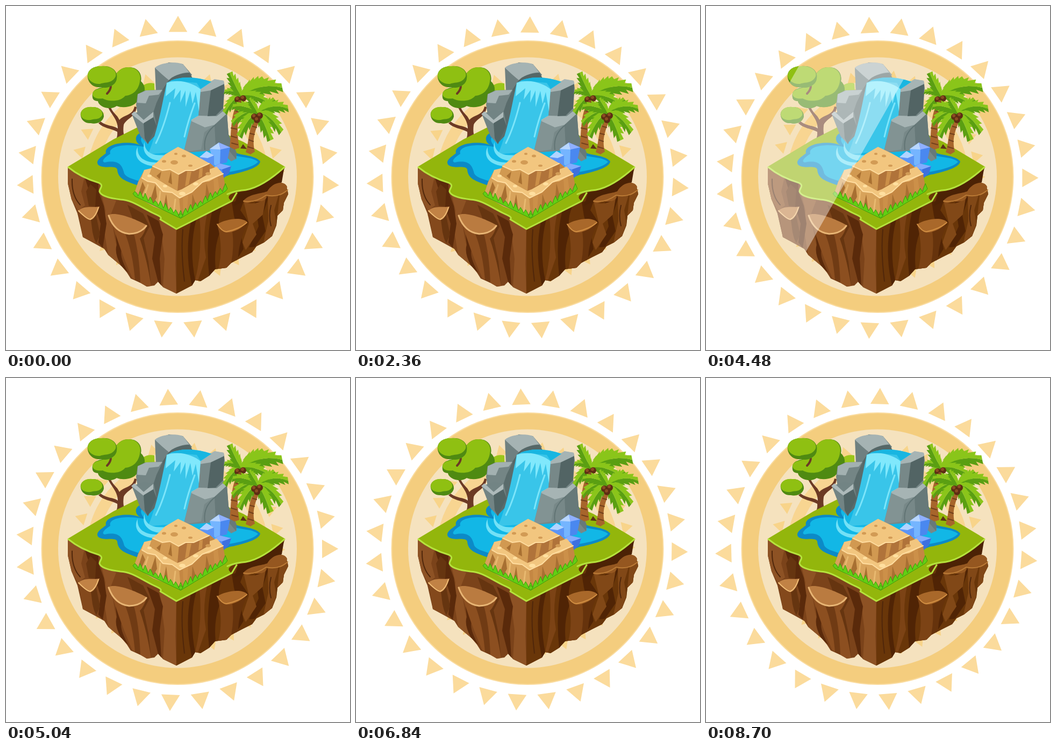
An HTML page for the animation above (8.84 s loop, 640 by 640 pixels).

```html
<!DOCTYPE html>
<html lang="en">
<head>
<meta charset="utf-8">
<title>Floating island</title>
<style>
html, body { margin: 0; width: 100%; height: 100%; overflow: hidden; background: #fff; }
svg { display: block; width: 100vw; height: 100vh; }
.line { fill: none; stroke-linecap: round; stroke-linejoin: round; }
</style>
</head>
<body>
<svg viewBox="0 0 640 640">
<defs>
  <mask id="cut" maskUnits="userSpaceOnUse" x="0" y="0" width="640" height="640" style="mask-type:alpha"><use href="#isle"/></mask>
</defs>
<g id="outer" fill="#fbdb9c"></g>
<circle cx="319" cy="317.5" r="252.5" fill="#f4cd7e" stroke="#fadb9d" stroke-width="2"/>
<circle cx="319" cy="317.5" r="222" fill="#f5e2be"/>
<g id="inner" fill="#f8d48a">
  <circle r="237.5" fill="none" stroke="#f8d591" stroke-width="31"/>
</g>

<g id="isle">
  <!-- tree -->
  <path fill="#9bc71a" d="M242 166C248 148 262 141 276 144L277 172 245 180Z"/>
  <path fill="#6c3a24" d="M195 257C205 252 208 243 207 234 194 227 182 228 172 218L176 215C188 224 200 222 208 228 208 212 197 203 190 189L194 187C200 201 207 202 211 212 219 202 236 204 239 187L243 188C241 207 224 209 219 221 217 235 219 247 229 254L219 253 213 258 208 254Z"/>
  <path fill="#4f8a12" d="M161 170C158 153 175 153 190 148 202 132 207 114 228 114 244 113 254 125 251 140 262 150 260 165 246 173 242 188 218 191 206 186 191 196 172 186 171 177 164 177 161 173 161 170Z"/>
  <path fill="#8fc012" d="M161 165C161 153 177 155 190 148 204 131 207 114 228 114 244 114 253 127 249 140 247 156 236 166 222 167 212 179 190 178 180 172 172 173 163 172 161 165Z"/>
  <path class="line" stroke="#6c3a24" stroke-width="4" d="M188 163Q194 157 195 150"/>
  <path fill="#4f8a12" d="M152 133C150 121 161 111 178 112 197 110 209 122 206 135 205 148 187 155 177 151 162 153 153 142 152 133Z"/>
  <path fill="#8fc012" d="M152 130C152 118 165 111 178 112 197 111 207 122 204 131 197 145 184 141 175 145 164 146 153 139 152 130Z"/>
  <path fill="#4f8a12" d="M139 204C137 192 151 187 160 188 174 187 183 197 182 206 179 218 165 220 158 218 147 219 140 212 139 204Z"/>
  <path fill="#8fc012" d="M139 202C139 191 151 187 160 188 172 187 181 195 179 203 173 213 164 209 158 212 147 213 140 209 139 202Z"/>

  <!-- soil -->
  <path fill="#7b431a" d="M115 299L115 330 122 360 133 386 143 430 165 442 183 452 190 463 215 484 225 496 232 507 250 515 262 522 276 520 283 513 292 523 317 535 346 520 352 510 362 512 378 502 388 490 410 487 419 478 440 467 458 458 466 447 480 440 495 428 503 408 505 390 515 380 517 366 525 350 521 334 509 328 519 299 317 400Z"/>
  <path fill="#693609" d="M317 412L317 535 346 520 352 510 362 512 378 502 388 490 410 487 419 478 440 467 458 458 466 447 480 440 495 428 503 408 505 390 515 380 517 366 525 350 521 334 509 328 519 299 430 340Z"/>
  <path fill="#8d5224" d="M115 299L146 318 140 345 147 371 134 381 122 360 115 330ZM176 345L205 362 195 388 202 430 215 484 190 463 183 420 185 380ZM286 398L317 414 315 480 317 535 292 523 295 470Z"/>
  <path fill="#5a2a0b" d="M146 317L172 328 172 345 182 372 187 405 180 450 172 440 176 405 166 374 157 352ZM262 388L284 400 292 425 286 470 289 520 283 513 272 470 277 430ZM204 425Q214 430 216 450 209 465 228 497L214 483Q201 460 206 444Z"/>
  <path fill="#663510" d="M157 331L168 342 166 373 154 372 149 345ZM226 370L255 386 267 410 256 432 265 475 270 521 250 513 246 470 231 430 239 405ZM158 395L166 382 175 425 168 441 158 420Z"/>
  <path fill="#8c4f20" d="M196 400Q216 424 239 424L262 408Q257 425 249 433 262 470 270 521L262 522 235 506Q215 462 196 400Z"/>
  <path fill="#703b14" d="M222 424Q236 460 240 510L250 515Q248 462 238 424Z"/>
  <path fill="#502405" d="M344 402L354 397Q340 450 352 510L346 520Q332 460 344 402ZM383 383L402 374Q392 398 398 420 386 452 390 489L378 502Q371 440 383 383ZM420 365L444 358 436 380 451 402 437 424 442 452 428 474 434 430 424 390ZM463 366L489 354 477 390 483 419 463 448 452 449 470 410Z"/>
  <path fill="#7c4315" d="M360 393L374 387Q365 430 372 468L357 511 352 510Q366 452 360 393ZM393 407L408 421 438 412Q426 448 421 476L410 487 395 489Q405 450 393 407Z"/>
  <path fill="#66330c" d="M421 419L448 404Q432 445 432 470L419 478Q425 446 421 419Z"/>
  <path fill="#814817" d="M442 363Q460 374 483 358L478 388 459 405 466 425 446 454 440 440 452 405ZM487 354L507 352 499 380 503 405 495 428 479 440 488 400ZM509 352L524 343 525 350 517 366 515 380 505 390Z"/>
  <path fill="#4c2205" d="M432 347C470 342 493 322 517 304L513 328 484 346 441 364 424 372Z"/>
  <path fill="#955720" d="M441 363C453 349 471 350 486 345 494 330 516 322 523 336 523 351 501 356 483 351 491 362 467 367 460 362 453 367 446 368 441 363Z"/>
  <path class="line" stroke="#bb7b36" stroke-width="2" d="M442 363Q463 367 484 352 508 357 524 342"/>
  <path fill="#a9682a" d="M393 406C408 397 437 391 449 402 439 414 421 423 408 421 399 417 398 410 393 406Z"/>
  <path class="line" stroke="#d18f43" stroke-width="2" d="M393 406Q402 420 410 420 434 415 448 403"/>
  <path fill="#84491c" d="M136 384L158 398 161 421 166 441 143 430Z"/>
  <path fill="#c18245" d="M134 381C147 370 160 376 174 373 169 386 165 397 157 398 147 391 142 387 134 381Z"/>
  <path class="line" stroke="#f0bc76" stroke-width="2" d="M135 381Q151 397 157 397 167 392 172 375"/>
  <path fill="#ba7b40" d="M190 389C205 381 245 398 262 408 254 421 238 427 222 424 202 416 194 401 190 389Z"/>
  <path class="line" stroke="#e8b574" stroke-width="3" d="M191 390Q202 421 229 424 250 424 261 409"/>
  <path class="line" stroke="#50270b" stroke-width="2" d="M123 322Q122 353 138 370M329 416Q325 456 332 512M493 371Q488 390 493 409"/>

  <!-- grass -->
  <path fill="#93b60c" d="M115 299L200 248 246 225 380 225 442 253 519 299C499 317 468 342 438 343 418 348 407 354 420 363L317 415 287 397C292 392 279 388 273 385 249 373 234 361 213 360 193 358 176 353 174 345 174 339 183 334 173 329 150 322 129 311 115 299Z"/>
  <path class="line" stroke="#b5e33d" stroke-width="3" d="M116 300Q139 319 173 329C183 334 174 339 174 345 176 353 193 358 213 360 234 361 249 373 273 385 281 389 292 392 287 397L317 415 420 363 429 348M412 350Q420 346 438 343C468 342 499 317 518 300"/>

  <!-- pond -->
  <path fill="#0c8ac7" d="M250 236C239 241 239 253 250 259 226 249 181 257 186 274 177 281 165 288 172 296 183 304 203 295 207 304 208 322 224 326 243 333L333 318 395 321C406 320 411 314 423 313 447 307 472 300 473 289 463 278 441 278 430 274L390 245 290 230Z"/>
  <path fill="#12b7e6" d="M256 240C247 247 252 256 260 263 229 255 189 259 194 275 181 283 177 290 184 291 211 285 216 298 219 308 220 318 234 321 245 325L333 310 395 312C420 308 457 303 469 290 459 281 439 282 425 278L390 253 290 237Z"/>

  <!-- left rocks -->
  <path fill="#6f8080" d="M277 115L303 105 329 108 346 128 328 150 309 165 291 198 279 162Z"/>
  <path fill="#a5b3b3" d="M277 115C286 105 319 102 330 109L341 124C326 122 314 132 303 138 294 131 286 123 277 115Z"/>
  <path fill="#556767" d="M303 138Q314 126 341 124L347 134 310 145 302 168 291 198 288 160Z"/>
  <path fill="#748585" d="M245 164L259 157 291 156 296 185 282 226 266 251 250 231 242 184Z"/>
  <path fill="#a3b1b1" d="M245 164L261 157 291 156 284 165 266 167 260 181 244 180Z"/>
  <path fill="#5a6c6c" d="M280 180L291 157 302 170 284 234 264 255 268 216Z"/>
  <path fill="#728484" d="M234 201L258 193 275 197 280 222 264 257 250 242Z"/>
  <path fill="#adbaba" d="M233 201L239 196 256 212 274 197 274 208 256 219Z"/>
  <path fill="#526565" d="M256 218L274 207 280 223 264 257 258 246Z"/>

  <!-- right rocks -->
  <path fill="#778888" d="M361 152L388 137 405 139 407 153 404 190 411 198 414 239 428 270 429 284 419 289 396 268 330 273 343 214 357 205Z"/>
  <path fill="#a6b4b4" d="M361 152L388 136 405 139 406 146 381 157 362 160ZM344 214L358 204 392 205 411 190 412 201 390 221 370 226Z"/>
  <path fill="#526464" d="M381 157L406 145 404 190 390 204 375 205Z"/>
  <path fill="#677979" d="M388 221L411 200 414 239 429 273 428 285 410 263 390 260Z"/>
  <path fill="#829393" d="M344 214L370 226 388 221 369 235 363 267 331 272Z"/>
  <path class="line" stroke="#617474" stroke-width="2" d="M390 221Q366 239 370 267"/>

  <!-- waterfall -->
  <path fill="#39c5e9" d="M299 143C321 130 352 130 382 141L362 155 358 204 345 212 331 270 264 276C282 235 290 184 299 143Z"/>
  <path fill="#19b6e1" d="M306 139C324 130 358 132 382 141L362 154 355 143Z"/>
  <path fill="#80e8fc" d="M299 143C324 134 351 145 362 155L359 196 353 160 347 182 343 158 334 188 334 157 324 180 325 156 312 174 315 153 297 168Z"/>
  <path class="line" stroke="#7ce5fa" stroke-width="3" d="M351 181Q338 216 332 243M305 180Q294 225 279 255"/>
  <path fill="#72e1f7" d="M258 253C257 272 273 280 298 277L286 288C260 285 252 268 258 253ZM245 262C243 283 260 293 287 291L274 298C247 295 236 279 245 262Z"/>

  <!-- palms -->
  <g id="palms"></g>

  <!-- crystals -->
  <path fill="#4a88ef" d="M379 266L396 254 417 263 411 291 388 297Z"/>
  <path fill="#b9d7ff" d="M379 266L396 254 399 267 390 271Z"/>
  <path fill="#8fb0ff" d="M396 254L417 263 399 267Z"/>
  <path fill="#75b5ff" d="M379 266L399 267 398 295 388 297Z"/>
  <path fill="#5b94f5" d="M360 281L373 270 387 278 387 299 371 295Z"/>
  <path fill="#b1d4ff" d="M360 281L373 270 387 278 375 283Z"/>
  <path fill="#3d70de" d="M381 302L398 293 419 298 415 311 404 321 386 315Z"/>
  <path fill="#82adff" d="M381 302L398 293 419 298 402 304Z"/>
  <path fill="#568ff4" d="M381 302L402 304 404 321 386 315Z"/>

  <!-- stone steps -->
  <path fill="#c48743" d="M257 306L246 327 238 351 274 373 325 391 352 379 409 342 404 313 379 292Z"/>
  <path fill="#d8a35b" d="M257 306L246 327 238 351 274 373 325 391 322 355 268 318Z"/>
  <path fill="#f2c67f" d="M257 305L274 301 319 338 378 304 392 299 404 312 378 326 365 328 346 346 323 357 309 347 292 345 278 329 263 326 252 320Z"/>
  <path fill="#b0733a" d="M273 296L267 313 301 334 319 344 327 341 379 311 379 292Z"/>
  <path fill="#d19951" d="M273 296L267 313 301 334 319 344 322 310Z"/>
  <path fill="#f2c67f" d="M320 262L345 274 379 293 360 300 349 306 334 306 321 313 305 304 291 306 272 298 285 287 296 276Z"/>
  <path class="line" stroke="#ffdda0" stroke-width="2" d="M273 298L291 306 305 304 321 313 334 306 349 306 378 293M253 320L263 326 278 329 292 345 309 347 323 357 346 346 365 328 404 312"/>
  <path fill="#a87032" d="M254 327L259 338 252 354 247 348ZM278 332L281 355 273 370 267 365ZM298 350L302 380 293 376ZM347 350L355 374 345 380ZM373 330L379 353 370 365ZM289 308L286 322 280 316ZM307 307L309 332 302 328Z"/>
  <path fill="#cc9049" d="M337 308L345 308 340 332 333 336ZM360 302L366 301 365 317 358 321ZM329 356L339 352 337 380 330 385ZM386 322L394 319 397 344 388 350Z"/>
  <path class="line" stroke="#e8b970" stroke-width="3" d="M264 333L256 358M287 345L284 370M315 360L312 384"/>
  <g fill="#d29b55"><ellipse cx="313" cy="291" rx="7" ry="4"/><ellipse cx="331" cy="279" rx="4" ry="2.5"/><ellipse cx="294" cy="289" rx="4" ry="2.5"/><ellipse cx="343" cy="297" rx="4" ry="2"/><ellipse cx="316" cy="275" rx="3" ry="2"/><ellipse cx="376" cy="312" rx="5" ry="3"/></g>
  <g fill="#ffdf9f"><ellipse cx="267" cy="316" rx="4" ry="2.5"/><ellipse cx="328" cy="349" rx="6" ry="3.5"/><ellipse cx="353" cy="331" rx="5" ry="3"/><ellipse cx="296" cy="335" rx="4" ry="2.5"/></g>
  <path id="tufts" fill="#62cf14" stroke="#3f9a0c" stroke-linejoin="round"/>
</g>

<g mask="url(#cut)"><g id="shine" fill="#fff" fill-opacity=".42">
  <path d="M184 90L-71 540H-280L-25 90ZM-56 90L-311 540H-337L-82 90Z"/>
</g></g>
</svg>
<script>
const NS = 'http://www.w3.org/2000/svg';
const $ = id => document.getElementById(id);

function add(parent, tag, attrs) {
  const el = document.createElementNS(NS, tag);
  for (const k in attrs) el.setAttribute(k, attrs[k]);
  parent.appendChild(el);
}

const RAYS = 31;
for (const id of ['outer', 'inner']) {
  for (let i = 0; i < RAYS; i++) {
    add($(id), 'path', { d: 'M0 -300L17.3 -269.9H-17.3Z', transform: `rotate(${i * 360 / RAYS})` });
  }
}

// Broad leaf with saw-tooth edges along a curved spine, light above and dark below
function frond(x, y, tx, ty, lift) {
  const n = 6, mx = (x + tx) / 2, my = (y + ty) / 2 - lift;
  const len = Math.hypot(tx - x, ty - y), flip = tx < x ? -1 : 1;
  const nx = (ty - y) / len * flip, ny = (x - tx) / len * flip;
  const at = t => [(1 - t) ** 2 * x + 2 * t * (1 - t) * mx + t * t * tx,
                   (1 - t) ** 2 * y + 2 * t * (1 - t) * my + t * t * ty];
  const spine = [...Array(n + 1).keys()].map(i => at(i / n));
  const side = s => {
    const pts = [];
    for (let i = 0; i < n; i++) {
      const w = s * (2 + len * .19 * Math.sin(Math.PI * (i + 1) / (n + 1)));
      const a = at(i / n), b = at(Math.min(1, (i + 1.3) / n));
      pts.push([a[0] + nx * w * .72, a[1] + ny * w * .72], [b[0] + nx * w, b[1] + ny * w]);
    }
    return [...pts, at(1)];
  };
  const draw = (s, fill) => add($('palms'), 'path',
    { d: 'M' + [...side(s), ...spine.slice().reverse()].join('L') + 'Z', fill });
  draw(-1, '#5a9f12');
  draw(1, '#8ac51a');
}

function palm(x, y, trunk, rings, tips) {
  add($('palms'), 'path', { d: trunk, fill: '#a7652b' });
  add($('palms'), 'path', { d: rings, class: 'line', stroke: '#72401b', 'stroke-width': 2 });
  tips.forEach(([tx, ty, lift]) => frond(x, y, tx, ty, lift));
  for (const [dx, dy] of [[-6, 7], [4, 5], [-1, 13]]) {
    add($('palms'), 'circle', { cx: x + dx, cy: y + dy, r: 6, fill: '#5d2d13' });
    add($('palms'), 'circle', { cx: x + dx - 1, cy: y + dy - 2, r: 3, fill: '#8b4c22' });
  }
}

palm(437, 167, 'M416 262C420 232 417 203 432 177L442 179C428 210 430 239 434 264L425 267Z',
  'M427 195L434 197M422 211L429 213M419 227L429 229M419 242L429 245M420 255L431 258',
  [[407, 199, 13], [406, 160, 10], [416, 124, -4], [480, 136, 8], [514, 152, 18], [486, 178, 10]]);
add($('palms'), 'path', { d: 'M436 265L441 257 448 266Z', fill: '#5c3216' });
palm(468, 199, 'M446 272C453 248 450 231 463 210L472 213C461 235 458 252 463 271L455 276Z',
  'M459 224L466 226M454 237L462 239M452 249L460 252M450 262L460 265',
  [[421, 219, 20], [434, 243, 17], [421, 188, 12], [452, 172, 1], [500, 174, 5], [525, 191, 16], [512, 235, 20], [492, 250, 12]]);

// Grass blades along the foot of the steps
function tufts(x0, y0, x1, y1, n) {
  let top = '';
  for (let i = 0; i <= n; i++) {
    const t = i / n, x = x0 + (x1 - x0) * t, y = y0 + (y1 - y0) * t;
    const h = 5 + 6 * Math.abs(Math.sin(i * 2.3));
    top += `L${x - 4} ${y - 1}L${x} ${y - h}L${x + 4} ${y - 1}`;
  }
  return `M${x0} ${y0 + 4}${top}L${x1} ${y1 + 4}Z`;
}
$('tufts').setAttribute('d', tufts(240, 350, 325, 391, 9) + tufts(325, 391, 408, 341, 9));

const LOOP = 8840, BLOCK = 1120, SWEEP = 3547;
const STARTS = [0, 120, 260, 360, 460, 560, 660, 760, 860, 1000];

function render(ms) {
  const t = ms % LOOP, part = t % BLOCK;
  const step = Math.floor(t / BLOCK) * 10 + STARTS.filter(s => s <= part).length - 1;
  const turn = step * 2.25;
  $('outer').setAttribute('transform', `translate(318.5 318.2) rotate(${turn}) translate(1.5 0)`);
  $('inner').setAttribute('transform', `translate(319.2 318) rotate(${180 - turn}) scale(.667)`);
  const glide = (step * 112 - 3780 + SWEEP * 2) % SWEEP;
  $('shine').setAttribute('transform', `translate(${glide - 490} 0)`);
}

const begin = performance.now();
function tick() {
  render(performance.now() - begin);
  requestAnimationFrame(tick);
}
tick();
</script>
</body>
</html>
```
